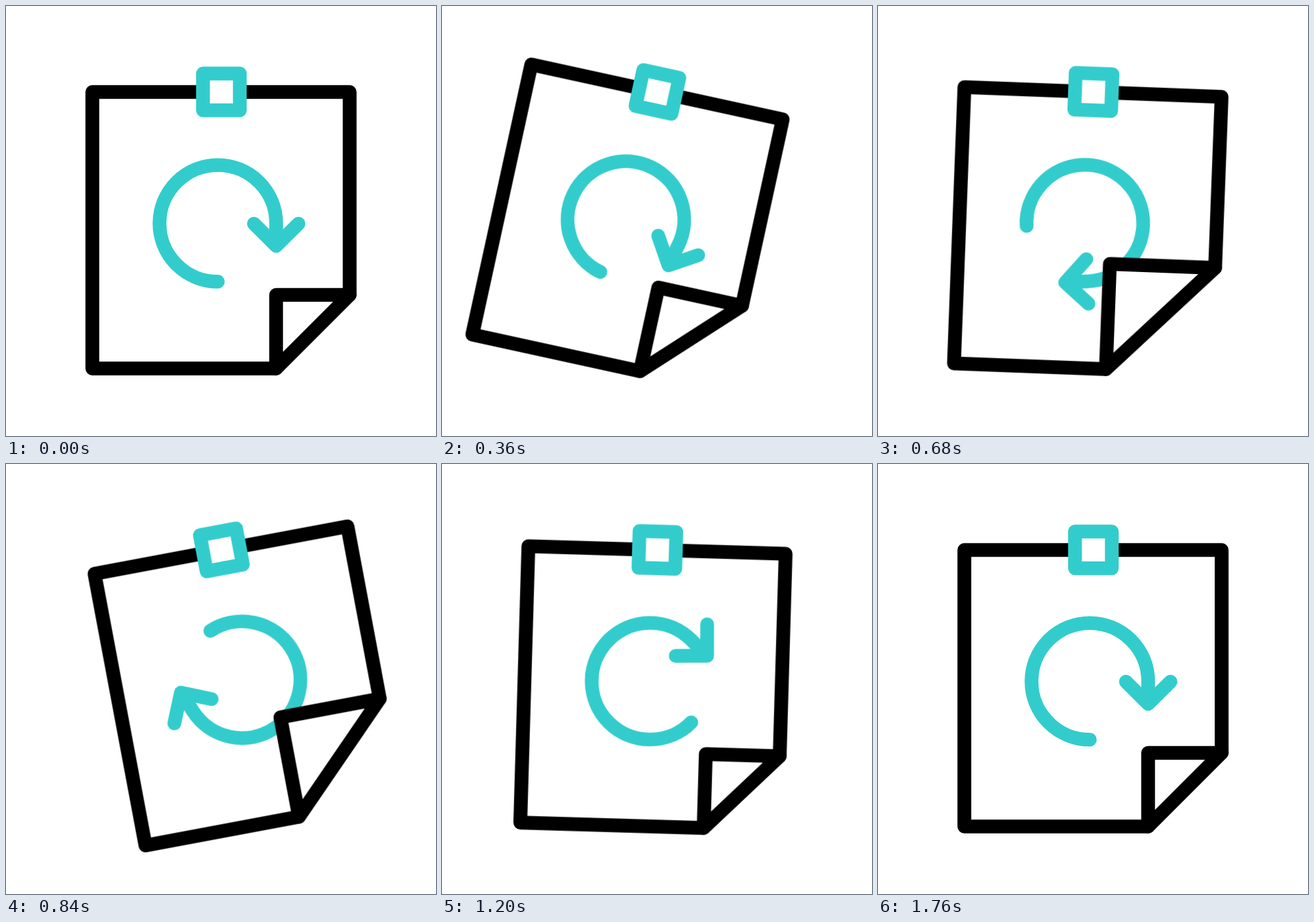
An HTML page without scripts for the animation above (1800 ms loop, 640 px wide and 640 px high).

```html
<!DOCTYPE html>
<html lang="en">
<head>
<meta charset="utf-8">
<title>Pinned note</title>
<style>
  html, body { margin: 0; width: 100%; height: 100%; overflow: hidden; background: #fff; }
  svg { display: block; width: 100%; height: 100%; }
  path, rect { fill: none; stroke: #000; stroke-width: 20.5; stroke-linecap: round; stroke-linejoin: round; }
  .flap, .pin { fill: #fff; }
  .arrow, .pin { stroke: #3cc; }

  .note, .arrow, .sheet, .flap { animation: 1800ms infinite cubic-bezier(.5, 0, .5, 1); }
  .note { transform-origin: 320.5px 128px; animation-name: swing; }
  .arrow { transform-origin: 315.3px 323.5px; animation-name: spin; animation-delay: -20ms; }
  .sheet { animation-name: trim; }
  .flap { animation-name: fold; }

  /* the note swings from its pin and settles */
  @keyframes swing {
    0%, .56% { transform: rotate(0deg); }
    27.5% { transform: rotate(14.2deg); }
    48.6% { transform: rotate(-10.9deg); }
    69.4% { transform: rotate(2deg); }
    95%, 100% { transform: rotate(0deg); }
  }

  /* one full turn: cubic in, softer out */
  @keyframes spin {
    0% { transform: rotate(0deg); animation-timing-function: cubic-bezier(.333, 0, .667, 0); }
    50% { transform: rotate(180deg); animation-timing-function: cubic-bezier(.333, .877, .66, 1); }
    93.9%, 100% { transform: rotate(360deg); }
  }

  /* the corner curls up and back; outline and flap share their end points */
  @keyframes trim {
    0%, 5.9%, 69.4%, 100% { d: path("M511.5 430V128H128.5V539.5H402"); }
    38.1% { d: path("M511.5 382.8V128H128.5V539.5H354.8"); }
  }
  @keyframes fold {
    0%, 5.9%, 69.4%, 100% { d: path("M402 430H511.5L402 539.5Z"); }
    38.1% { d: path("M354.8 382.8H511.5L354.8 539.5Z"); }
  }
</style>
</head>
<body>
<svg viewBox="0 0 640 640">
  <g class="note">
    <path class="arrow" d="M315.3 410.3A86.8 86.8 0 1 1 402.1 323.5V357M369 324L402.1 357L435.3 324"/>
    <path class="sheet" d="M511.5 430V128H128.5V539.5H402"/>
    <path class="flap" d="M402 430H511.5L402 539.5Z"/>
    <rect class="pin" x="293.2" y="100.5" width="54.8" height="54.8"/>
  </g>
</svg>
</body>
</html>
```
